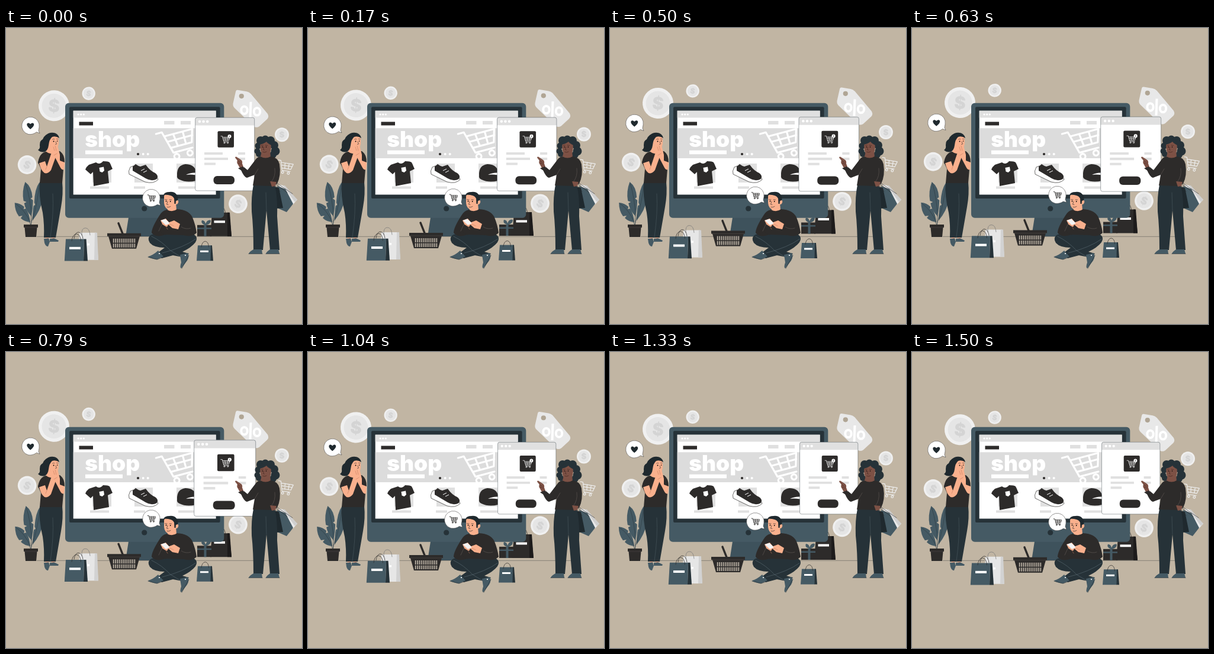
Write an HTML page that moves like this. It is 500 px wide and 500 px high and loops after 1540 ms.

```html
<!DOCTYPE html>
<html lang="en">
<head>
<meta charset="utf-8">
<title>Online shop</title>
<style>
html,body{margin:0;width:100%;height:100%;overflow:hidden;background:#c1b5a3}
svg{display:block;width:100vw;height:100vh}
text{font-family:Inter,"Open Sans",sans-serif;font-weight:900}
.k{fill:#2d2b2a}.n{fill:#263238}.s{fill:#455a64}.w{fill:#fff}.g{fill:#e0e0e0}
.skin{fill:#f9b08d}.brown{fill:#7d5145}.hair{fill:#1f292e}
.l{fill:none;stroke:#2d2b2a;stroke-width:.7;stroke-linecap:round;stroke-linejoin:round}
.cart{fill:none;stroke-linecap:round;stroke-linejoin:round}
.edge{fill:#fff;stroke:#2d2b2a;stroke-width:.5;stroke-linejoin:round}
</style>
</head>
<body>
<svg viewBox="0 0 500 500">
<defs>
  <g id="coin">
    <circle r="26" fill="#f0f0f0"/><circle r="20.500" fill="#e5e5e5"/>
    <text y="10.500" font-size="29" text-anchor="middle" fill="#d4d4d4">$</text>
  </g>
  <g id="cart" class="cart">
    <path d="M0 2H4L8 17H21M5 5H24L21.500 13.500H7M6 9H23M11 5L12 13.500M17.500 5V13.500"/>
    <circle cx="9.500" cy="20" r="1.700"/><circle cx="18.500" cy="20" r="1.700"/>
  </g>
  <clipPath id="screen"><path d="M113.700 139.700H354.600V281.600H113.700Z"/></clipPath>
</defs>
<rect width="500" height="500" fill="#c1b5a3"/>
<path d="M52 352.300H448" stroke="#5f5d58" stroke-width=".6"/>

<!-- coins, tag, cart, bag behind the monitor -->
<g class="float">
  <use href="#coin" transform="translate(81 128.500) rotate(4)"/>
  <use href="#coin" transform="translate(139.700 107.800) rotate(10) scale(.43)"/>
  <use href="#coin" transform="translate(35.700 228.200) rotate(24) scale(.61)"/>
  <use href="#coin" transform="translate(466 177.500) scale(.46)"/>
  <use href="#coin" transform="translate(392 294.300) rotate(22) scale(.61)"/>
  <path d="M391 105L406 107.500Q409 108 411 110L439.500 144Q441 147 439 149L426 161Q423 163 420 161L388 130Q386 128 386.500 125Z" fill="#e8e8e8" stroke="#e8e8e8" stroke-width="6" stroke-linejoin="round"/>
  <circle cx="397.800" cy="112.300" r="4.100" fill="#b0a594"/>
  <g fill="none" stroke="#fff" stroke-width="4">
    <ellipse cx="402.500" cy="136" rx="5.200" ry="6.200"/><ellipse cx="424" cy="138.500" rx="5.200" ry="6.200"/>
    <path d="M413.500 122L412.500 150"/>
  </g>
  <use href="#cart" transform="translate(460.500 218) rotate(9) scale(1.08)" stroke="#eee" stroke-width="1.100"/>
  <path d="M348 309H377L381 349H345Z" class="k"/><path d="M374 309H378L381 349H374Z" fill="#1d1b1b"/>
  <path d="M355 313Q355 299 363 299Q370 299 371 313" class="l"/>
  <path d="M351.500 322.500H370V326.500H351.500Z" class="w"/>
</g>

<!-- monitor -->
<path d="M207 320H261L267 352H202Z" fill="#3e525c"/>
<rect x="100" y="126.800" width="268.300" height="194" rx="6" class="s"/>
<rect x="107" y="133.300" width="254.600" height="154.700" rx="2" class="n"/>
<g clip-path="url(#screen)">
  <path d="M113 139H355V282H113Z" class="w"/>
  <path d="M113 139H355V151.500H113ZM267 157H284.500V163H267ZM295 157H312V163H295Z" class="g"/>
  <path d="M113 169.300H355V220H113Z" fill="#dcdcdc"/>
  <g class="w">
    <circle cx="122" cy="146" r="1.600"/><circle cx="126.700" cy="146" r="1.600"/><circle cx="131.300" cy="146" r="1.600"/>
    <text x="133.300" y="201" font-size="37">shop</text>
    <path d="M134 206.800H197V213.300H134Z"/>
    <circle cx="231.700" cy="213" r="2"/><circle cx="239.700" cy="213" r="2"/>
  </g>
  <circle cx="223" cy="213" r="2.100" class="k"/>
  <path d="M123.500 158.500H147V164.500H123.500Z" class="k"/>
  <use href="#cart" transform="translate(252 174) rotate(-15) scale(2.550)" stroke="#fff" stroke-width="1.250"/>
  <path d="M142 267.500H174V271.500H142ZM216 267.500H235V271.500H216ZM291 267.500H323V271.500H291ZM146 229H178V261H146ZM217 229H248V261H217ZM288 229H320V261H288Z" class="g"/>
  <path d="M149 228L140 231Q136 234 134 239L143 247 147 243 148 267 174 262 172 242 180 238 175 227Q173 225 164 225Q158 232 152 227Z" class="k"/>
  <path d="M157.500 236L165 234.500 166 241 162.500 244 158.500 242.500Z" class="w"/>
  <path d="M210 235Q206 242 208 247L235 260Q249 264 257 256L254 249 215 233Z" fill="#fff" stroke="#2d2b2a" stroke-width=".7"/>
  <path d="M214 234L219 230Q223 233 227 234L236 231Q243 241 252 245Q258 249 255 255Q246 260 236 254L214 241Z" class="k"/>
  <path d="M228 241L234 238M232 244L238 241M213 244L219 247" stroke="#fff" stroke-width="1"/>
  <path d="M289 249Q288 232 303 230Q317 230 321 241V258Q305 262 293 256Q288 254 289 249Z" class="k"/>
  <path d="M304 248Q311 244 321 244.500V248.500Q311 247 304 248Z" class="w"/>
</g>
<circle cx="233.700" cy="305" r="4.600" class="n"/>

<!-- potted plant -->
<g id="plant">
  <path d="M42 333Q45 310 34 263M42 333Q33 312 16 297M42 333Q48 305 58 264" class="l" style="stroke:#37474f"/>
  <g class="s">
    <path d="M33 260Q44 268 45 286L42 288 46 291Q46 304 43 318Q33 308 31 296L35 294 30 292Q27 276 33 260Z"/>
    <path d="M15 295Q25 296 31 302L30 306 34 305Q40 315 41 328Q31 327 25 321L28 317 22 318Q15 309 15 295Z"/>
    <path d="M57 261Q63 270 62 285L58 288 62 290Q59 308 45 325Q45 308 47 300L50 299 48 295Q49 272 57 261Z"/>
  </g>
  <path d="M34 263Q42 290 43 318M17 297Q32 307 41 328M57 264Q54 292 45 325" class="l" style="stroke:#263238;stroke-width:.5"/>
</g>
<path d="M30 332H54V337H52.500L51 353H33L31.500 337H30Z" class="k"/>
<path d="M31.500 337H52.500" stroke="#4a4644" stroke-width=".6"/>

<!-- bags, basket, gift -->
<g class="float">
  <path d="M124 343H152L156 389H122Z" fill="#e6e6e6"/><path d="M150 343H154L156 389H149Z" fill="#d2d2d2"/>
  <path d="M128 347Q127 335 134 335Q141 335 142 347" class="l" style="stroke:#777"/>
  <path d="M101 353.700H132L131 390.700H98.800Z" class="s"/><path d="M132 353.700H135.500L138 390.700H131Z" class="n"/>
  <path d="M111 357Q112 346 119 345Q126 346 126.500 357M115 353Q116 343 122 342Q129 343 130 353" class="l"/>
  <path d="M107 367H126V371H107Z" class="w"/><path d="M137 361H141V364.500H137Z" class="w"/>
  <path d="M198 347L190 327" stroke="#2d2b2a" stroke-width="3.400" stroke-linecap="round"/>
  <path d="M171 344H228V349H226L220 370H179L173 349H171Z" class="k"/>
  <path d="M172 349H227" stroke="#514c49" stroke-width=".6"/>
  <g id="slots" stroke="#d0c6b7" stroke-width="1.500"></g>
  <path d="M323 330H347V349H323Z" class="k"/>
  <path d="M334.500 330H338.500V349H334.500ZM323 334.500H347V337H323ZM336 330Q328 327 331 322Q336 322 337 328Q340 320 346 322Q346 328 339 330Z" class="s"/>
  <path d="M324 364.500H347L346 390.500H322Z" class="s"/><path d="M346 364.500H348L350 390.500H345.500Z" class="n"/>
  <path d="M330 367Q331 358 336.500 357.500Q342 358 342.500 367" class="l"/>
  <path d="M328 373H342V376H328Z" class="w"/>
</g>

<!-- woman, left -->
<g>
  <path d="M66 350H73L72 358 67 358ZM76 350H83L82 357 77 358Z" class="skin"/>
  <path d="M64 356L72 355 74 361 71 369Q67 369 65 363ZM74 356L81 355 89 359 88 361 74 361Z" class="s"/>
  <path d="M57 260L95 260Q97 280 93 302L84 354H64Q65 332 62 312Q55 284 57 260Z" class="n"/>
  <path d="M79 280Q81 312 75 353" class="l" style="stroke:#46545a"/>
  <path d="M67 209L91 208Q98 213 98 226L95 262H57L59 238 54 227Q57 211 67 209Z" class="k"/>
  <path d="M69 200H80V211Q74 214 68 209Z" class="skin"/>
  <path d="M76 179Q89 178 89 190Q90 202 82 207Q72 207 69 196Z" class="skin"/>
  <path d="M67 181Q74 175 83 177.500Q89 180 90 186Q84 182 78 184Q73 188 72 198Q71 206 66 209Q59 211 54 206Q58 204 57 198Q57 190 62 188Q63 184 67 181Z" class="hair"/>
  <circle cx="80.500" cy="191.500" r=".9"/><circle cx="86.700" cy="191" r=".8"/>
  <path d="M78.500 188.200Q80 186.700 82 187.800M85.500 187.500L88 187.700M84 192L85.500 196 83.500 196.500" class="l" style="stroke-width:.6"/>
  <path d="M56 228L66 225 69 234 78 207Q82 199 87 202Q89 206 86 212L76 240Q71 247 65 245Q59 241 56 228Z" class="skin"/>
  <path d="M78 206Q76 200 80 198L87 198Q89 206 91 214L99 227 98 239Q94 241 91 234L81 215Z" class="skin"/>
  <path d="M80 201L82 207M83 199L85 207M81 215L86 212M69 234L67 239" class="l" style="stroke:#c67e60;stroke-width:.6"/>
  <path d="M54 229L67 224 66 211Q56 213 54 229ZM91 224L99 227Q99 213 91 209Z" class="k"/>
</g>

<!-- seated man -->
<g>
  <path d="M272 294L287 294 288 309Q281 315 273 308Z" class="skin"/>
  <path d="M244 350Q252 345 275 349Q300 342 318 349Q325 354 320 362Q313 371 298 378L309 381 303 388 282 384 263 389 256 380 268 371Q250 371 243 363Q238 355 244 350Z" class="n"/>
  <path d="M246 352Q263 360 278 376L298 388M321 356Q300 371 264 380" class="l" style="stroke:#53636a"/>
  <path d="M257 376L266 386 255 391Q242 389 240 386Q248 384 257 376ZM294 383L307 380Q310 387 306 393L296 406Q293 405 296 396Z" class="s"/>
  <path d="M240 387L255 391 266 387M309 384L297 406" class="l" style="stroke:#263238"/>
  <circle cx="259" cy="381" r="1.100" class="w"/><circle cx="303" cy="384" r="1.100" class="w"/>
  <path d="M272 307Q281 312 289 306Q309 307 315 320Q320 332 322 346Q314 354 300 350L269 349Q253 355 246 346Q246 337 259 317Q264 308 272 307Z" class="k"/>
  <path d="M264 330L258 343M296 336Q304 341 312 338" class="l" style="stroke:#5b5552"/>
  <path d="M267 284Q268 279 278 279Q288 280 288 291Q287 304 277 307Q268 306 267 296Z" class="skin"/>
  <path d="M288 291Q292 290 291 295Q289 300 286 297Z" class="skin"/>
  <path d="M266 282Q268 277 276 277Q283 276 287 280Q292 285 290 291L287 292 286.500 297 284.500 297 284 288Q282 284 278 283Q272 281 266 282Z" class="hair"/>
  <circle cx="270.500" cy="292.500" r=".9"/><circle cx="277.700" cy="293" r=".9"/>
  <path d="M268.500 289.700L272 290M276 290L279.500 290.200M273 293L271.500 298 274 298.500M272 302.500Q275 303.500 278 301.500" class="l" style="stroke-width:.65"/>
  <path d="M261 325L270 322 276 329 272 336 265 333Z" class="skin"/>
  <path d="M276 328L284 325 294 331 291 340 281 338 273 331Z" class="skin"/>
  <path d="M261.500 325L269 322.500 277 330 270 333Z" fill="#f3f3f3"/>
  <path d="M268 333L273 340M276 331L283 334" class="l" style="stroke:#c67e60;stroke-width:.6"/>
  <path d="M270 350L271 337 265 332 259 343Z" class="k"/>
</g>

<!-- speech bubbles -->
<g class="float">
  <path d="M51.500 173Q46 177.500 38 176.800A14.800 14.800 0 1 1 56 165L55 171 57 175Z" class="edge"/>
  <path d="M41.200 168.300Q34 162.500 35.500 159Q38 156 41.200 159.500Q44.500 156 47 159Q48.500 162.500 41.200 168.300Z" class="hair"/>
  <path d="M255.500 295.500Q250 299.500 242 298.800A14.800 14.800 0 1 1 260 287L259 292 261 297Z" class="edge"/>
  <use href="#cart" transform="translate(239 278) scale(.56)" stroke="#2d2b2a" stroke-width="1.500"/>
</g>

<!-- pop-up window -->
<g id="popup">
  <rect x="319.700" y="151.300" width="100" height="123.600" rx="3" class="w"/>
  <path d="M319.700 164.500V154.300Q319.700 151.300 322.700 151.300H416.700Q419.700 151.300 419.700 154.300V164.500Z" class="g"/>
  <rect x="319.700" y="151.300" width="100" height="123.600" rx="3" fill="none" stroke="#263238" stroke-width=".4"/>
  <g class="w"><circle cx="327" cy="158" r="2.200"/><circle cx="333.600" cy="158" r="2.200"/><circle cx="340.200" cy="158" r="2.200"/></g>
  <rect x="357.500" y="174.300" width="27.500" height="27.500" rx="2" class="k"/>
  <use href="#cart" transform="translate(363 181.500) scale(.62)" stroke="#fff" stroke-width="1.200"/>
  <circle cx="377.500" cy="183" r="3" class="w"/><path d="M377.500 181.500V184.500" stroke="#2d2b2a" stroke-width=".7"/>
  <path d="M335 210H366V214H335ZM335 219H375V223H335ZM335 227.500H354V231.500H335ZM392 210H404V214H392ZM392 219H404V223H392Z" class="g"/>
  <rect x="350.500" y="250" width="35.500" height="14" rx="6" class="k"/>
</g>

<!-- woman, right -->
<g>
  <path d="M460 264L468 266 492 290 485 298 474 292Z" fill="#e9e9e9"/><path d="M468 266L471 266 492 290 488 294Z" fill="#cfcfcf"/>
  <path d="M458 267L472 272 485 297 474 311 456 303Z" class="s"/><path d="M453 268L461 270 468 304 455 305Z" class="hair"/>
  <path d="M449 260L463 276M451 260L475 278M453 259L484 280" class="l" style="stroke-width:.6"/>
  <path d="M418 265H454Q459 285 458 318L462 375H446L440 308 434 375H418Q418 337 415 310Q414 284 418 265Z" class="n"/>
  <path d="M439 278L440 308" class="l" style="stroke:#46545a"/>
  <path d="M418 374H432L433 381H410Q411 378 418 374ZM446 374H460L462 381H439Q440 378 446 374Z" class="s"/>
  <path d="M410 381.500H433M439 381.500H462" class="l" style="stroke:#263238"/>
  <g class="n">
    <circle cx="430" cy="190" r="7"/><circle cx="438" cy="188" r="6.500"/><circle cx="447" cy="190" r="7"/>
    <circle cx="453" cy="198" r="7"/><circle cx="455" cy="208" r="7.500"/><circle cx="451" cy="214" r="6"/>
    <circle cx="426" cy="199" r="5.500"/><circle cx="424.500" cy="208" r="5"/><circle cx="427" cy="213" r="5"/>
  </g>
  <path d="M433 205H446L447 219Q438 224 430 217Z" class="brown"/>
  <path d="M429.500 194Q438 188 447 194Q449 204 446 210Q441 217 434 215Q428 209 429.500 194Z" class="brown"/>
  <path d="M428 197Q429 187 438 187Q447 187 449 198Q443 196 440 192Q435 196 428 197Z" class="n"/>
  <circle cx="433.200" cy="201" r=".8"/><circle cx="439.500" cy="201" r=".8"/>
  <path d="M431.500 198.300L434.500 198M438 198L441.500 198.500M435.500 201L434.500 205.500 436.500 206M434 209.500Q437 211 440 209" class="l" style="stroke:#3b211c;stroke-width:.6"/>
  <path d="M430 217Q438 222 447 217Q459 218 462 230Q465 249 458 263L450 267 417 266 420 248 407 253Q402 252 397 240L402 235 408 240 421 223Q424 218 430 217Z" class="k"/>
  <path d="M420 248L426 238M454 237Q456 251 448 260" class="l" style="stroke:#59524f"/>
  <path d="M446 259L457 260 455 267 449 268Z" class="brown"/>
  <path d="M402 237L397 240 392 231Q389 227 391 224L387 219Q387 217 389 217.500L396 222Q400 224 399 229Z" class="brown"/>
  <path d="M391 224L396 227M392 228L397 230" class="l" style="stroke:#4c2d26;stroke-width:.6"/>
  <path d="M392 237L400 234 403 237 398 241Z" class="k"/>
</g>
</svg>
<script>
const LOOP = 1540;
const floats = document.querySelectorAll('.float');
const popup = document.getElementById('popup');
const plant = document.getElementById('plant');

let slots = '';
for (let i = 0; i < 12; i++) {
  const x = 181.6 + i * 3.25;
  slots += `<path d="M${x} 353V360M${x} 361.500V368"/>`;
}
document.getElementById('slots').innerHTML = slots;

const pulse = [[0, 1], [330, 1.008], [630, 1.02], [790, 1.04], [1040, .983], [1500, .983], [LOOP, 1]];

function track(keys, t) {
  let i = 1;
  while (i < keys.length - 1 && t > keys[i][0]) i++;
  const [a, u] = keys[i - 1], [b, v] = keys[i];
  return u + (v - u) * (t - a) / (b - a);
}

function draw(t) {
  const wave = Math.cos((t + 20) / LOOP * 2 * Math.PI);
  for (const el of floats) el.setAttribute('transform', `translate(0 ${2.8 * wave})`);
  plant.setAttribute('transform', `rotate(${-0.5 * wave} 42 333)`);
  popup.setAttribute('transform', `translate(369.7 213) scale(${track(pulse, t)}) translate(-369.7 -213)`);
}

const start = performance.now();
function tick() {
  draw((performance.now() - start) % LOOP);
  requestAnimationFrame(tick);
}
draw(0);
requestAnimationFrame(tick);
</script>
</body>
</html>
```
